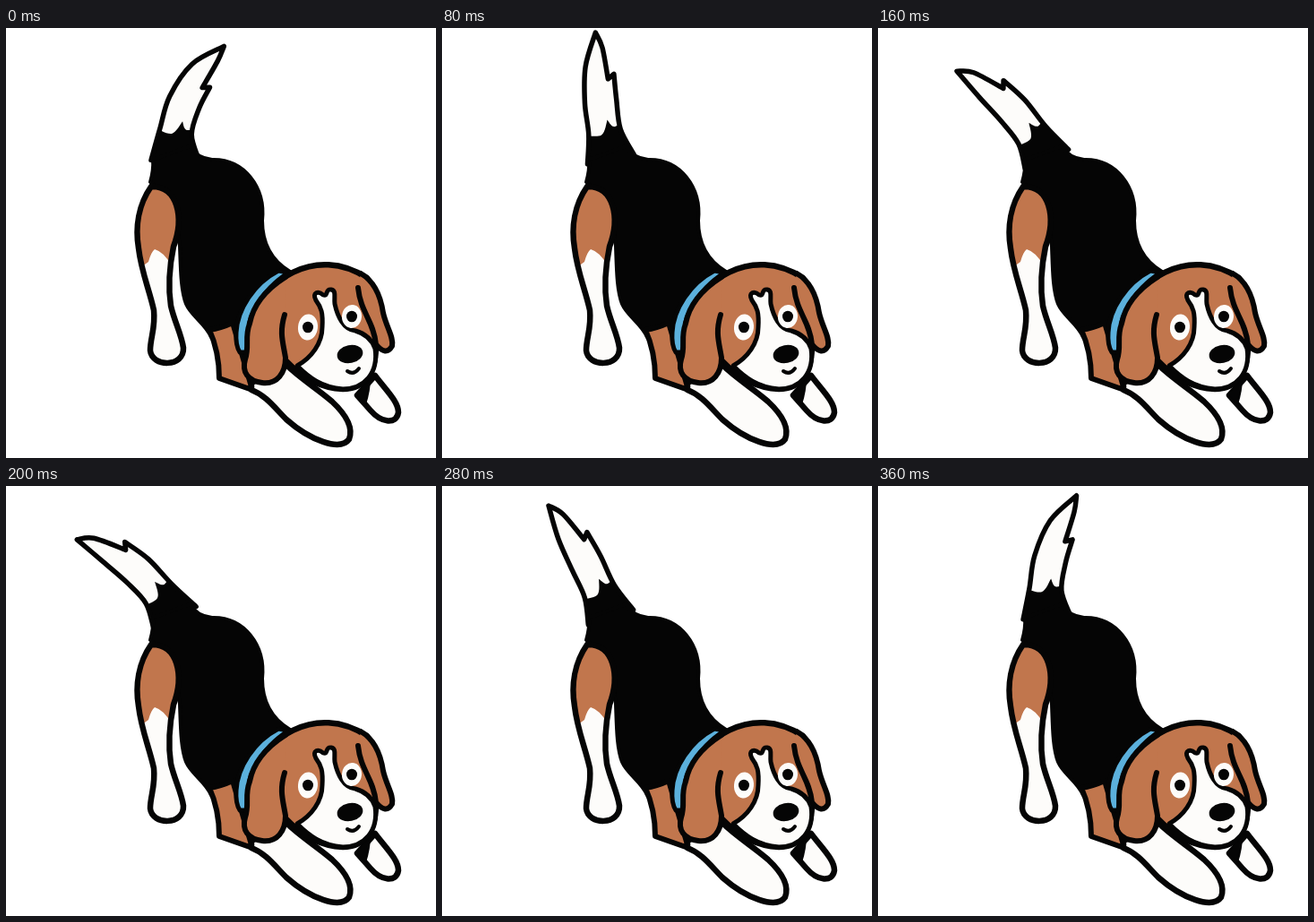
These frames come from a looping animation (480x480 px, 0.4 s). An HTML page with a canvas:

```html
<!DOCTYPE html>
<html lang="en">
<head>
<meta charset="utf-8">
<title>Wagging dog</title>
<style>
  html, body { margin: 0; width: 100%; height: 100%; overflow: hidden; background: #fff; }
  canvas { display: block; width: 480px; height: 480px; }
</style>
</head>
<body>
<canvas id="stage" width="480" height="480"></canvas>
<script>
const ctx = document.getElementById('stage').getContext('2d');
const BLACK = '#050505', WHITE = '#fdfcfa', TAN = '#c1764d', BLUE = '#5bb0dc';
const OUTLINE = 6.5, INNER = 5;
const STEP_MS = 40, HALF_SWING = 5;
const TAIL = { x: 187, y: 147, length: 143 };
const rad = deg => deg * Math.PI / 180;

function shape(d, fill, line = 0) {
  const path = new Path2D(d);
  if (fill) {
    ctx.fillStyle = fill;
    ctx.fill(path);
  }
  if (line) {
    ctx.lineWidth = line;
    ctx.strokeStyle = BLACK;
    ctx.stroke(path);
  }
}

function ellipse(x, y, rx, ry, turn, fill) {
  ctx.beginPath();
  ctx.ellipse(x, y, rx, ry, turn, 0, Math.PI * 2);
  ctx.fillStyle = fill;
  ctx.fill();
}

function eye(x, y, rx, ry) {
  ellipse(x, y, rx, ry, 0.1, WHITE);
  ellipse(x, y, 6, 6.3, 0, BLACK);
}

// Smooth curve through the points, continuing the path from the first one
function spline(path, pts) {
  for (let i = 0; i < pts.length - 1; i++) {
    const a = pts[Math.max(i - 1, 0)], b = pts[i], c = pts[i + 1], d = pts[Math.min(i + 2, pts.length - 1)];
    path.bezierCurveTo(b[0] + (c[0] - a[0]) / 6, b[1] + (c[1] - a[1]) / 6,
      c[0] - (d[0] - b[0]) / 6, c[1] - (d[1] - b[1]) / 6, c[0], c[1]);
  }
}

// The tail is a circular arc: lean is the angle of its chord, bend its total turn.
// The returned function maps (part of the length, sideways offset) to the stage.
function tailSpace(lean) {
  const bend = rad(18) + 1.33 * lean;
  const root = lean - bend / 2;
  return ([along, side]) => {
    const half = bend * along / 2;
    const chord = TAIL.length * along * (Math.abs(half) > 1e-6 ? Math.sin(half) / half : 1);
    const heading = root + 2 * half;
    return [
      TAIL.x + chord * Math.sin(root + half) + side * Math.cos(heading),
      TAIL.y - chord * Math.cos(root + half) + side * Math.sin(heading)
    ];
  };
}

function drawTail(lean) {
  const place = tailSpace(lean);
  const tip = [1, 0], spike = [0.665, 18];
  const outline = new Path2D();
  const base = place([0, -25]);
  outline.moveTo(...base);
  spline(outline, [[0, -25], [0.22, -18], [0.46, -17.5], [0.74, -13], tip].map(place));
  spline(outline, [tip, [0.88, 7], [0.63, 11]].map(place));
  outline.lineTo(...place(spike));
  spline(outline, [spike, [0.46, 18], [0.22, 18], [0, 28]].map(place));
  ctx.fillStyle = WHITE;
  ctx.fill(outline);

  ctx.save();
  ctx.clip(outline);
  const marking = new Path2D();
  marking.moveTo(...base);
  marking.lineTo(...place([0.22, -24]));
  spline(marking, [[0.22, -24], [0.2, -4], [0.31, 5]].map(place));
  spline(marking, [[0.31, 5], [0.25, 11], [0.28, 24]].map(place));
  marking.lineTo(...place([0, 40]));
  ctx.fillStyle = BLACK;
  ctx.fill(marking);
  ctx.restore();

  ctx.lineWidth = 5.5;
  ctx.strokeStyle = BLACK;
  ctx.stroke(outline);
}

function drawBody() {
  shape('M164 147Q165 158 161 172L186 190L194 243C195 270 195 292 201 308C207 322 222 329 229 345' +
    'L262 350L317 272C297 260 286 240 286 215C290 178 266 146 230 147Q213 145 205 132Z', BLACK, 4);

  // Hind leg
  const leg = 'M162 177C148 197 144 222 148 246C151 272 160 292 165 315C167 335 161 346 161 360' +
    'C163 379 199 379 198 357C196 342 188 328 184 310C181 290 182 268 187 244C199 212 192 176 162 177Z';
  shape(leg, WHITE);
  ctx.save();
  ctx.clip(new Path2D(leg));
  shape('M130 160H205V262L184 264Q176 250 166 247Q162 250 159 261L148 269Z', TAN);
  ctx.restore();
  shape(leg, null, OUTLINE);

  // Chest
  shape('M227 337Q240 335 253 329L275 404L238 391Q238 361 227 337Z', TAN, 6);
}

function drawFrontLegs() {
  shape('M392 410L412 388C424 404 438 417 438 429C436 443 419 441 407 427Z', WHITE, OUTLINE);
  shape('M391 409L407 390Q407 405 402 420Z', BLACK);
  shape('M274 404V396L313 376C328 391 348 403 364 417C380 432 388 446 383 459' +
    'C373 473 339 460 313 437C300 424 290 410 274 404Z', WHITE, OUTLINE);
}

function drawHead() {
  // Collar
  shape('M304 271C277 285 258 314 257 340Q256 354 261 362L270 362C266 325 285 292 316 273Z', BLUE, INNER);

  shape('M272 330C285 283 345 241 403 279Q415 310 413 350C414 385 400 403 376 403C350 402 330 390 312 371Z', TAN, OUTLINE);

  // Muzzle and blaze
  shape('M346 304C341 295 349 293 354 298C360 300 356 291 363 292C369 293 366 300 367 308' +
    'C370 322 377 337 390 338Q407 343 412 358C416 385 400 403 376 403C352 401 338 390 325 377' +
    'C341 368 353 352 353 334C354 318 352 312 346 304Z', WHITE, INNER);

  // Ears
  shape('M393 290C396 318 410 326 413 353Q424 367 431 355C433 345 425 335 421 318C418 298 410 282 396 274', TAN, 6);
  shape('M311 320C305 340 309 350 312 368C312 385 303 398 286 396C270 394 263 384 267 370' +
    'C272 355 266 345 272 330C276 308 290 292 312 278', TAN, 6);

  eye(337, 334, 11, 14.5);
  eye(386, 322, 11, 13);

  // Nose and mouth
  ellipse(384, 364, 14.5, 10, -0.2, BLACK);
  shape('M381 383Q388 388 394 380', null, 4);
}

function leanAt(now) {
  const step = Math.floor(now / STEP_MS) % (2 * HALF_SWING);
  const progress = Math.min(step, 2 * HALF_SWING - step) / HALF_SWING;
  return rad(-13.5 + 37.5 * Math.cos(Math.PI * progress ** 0.9));
}

function draw(now) {
  ctx.fillStyle = '#fff';
  ctx.fillRect(0, 0, 480, 480);
  drawTail(leanAt(now));
  drawBody();
  drawFrontLegs();
  drawHead();
}

ctx.lineJoin = ctx.lineCap = 'round';
let start;
function tick(now) {
  start ??= now;
  draw(now - start);
  requestAnimationFrame(tick);
}
draw(0);
requestAnimationFrame(tick);
</script>
</body>
</html>
```
